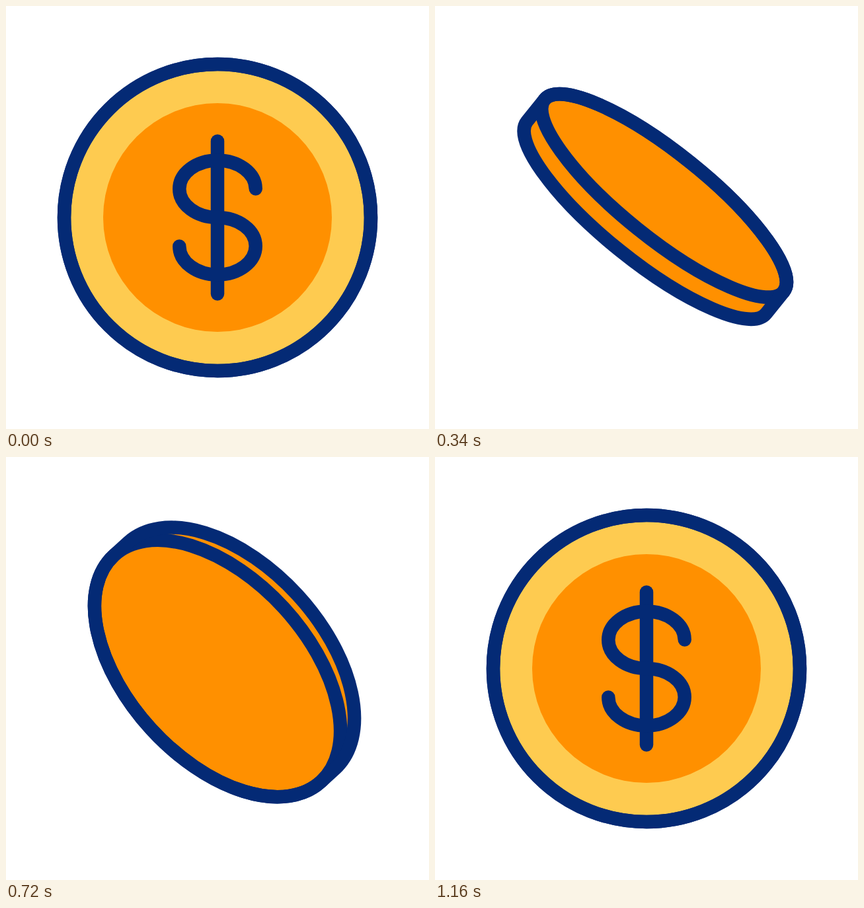
An HTML page that plays this animation: 640 px wide and 640 px high, repeating every 1400 ms.

```html
<!DOCTYPE html>
<html lang="en">
<head>
<meta charset="utf-8">
<title>Coin flip</title>
<style>
  html, body { margin: 0; width: 100%; height: 100%; overflow: hidden; background: #fff; }
  svg { display: block; width: 640px; height: 640px; }
  .line { fill: none; stroke: #042a75; stroke-width: 20.5; stroke-linecap: round; stroke-linejoin: round; }
  .line path { vector-effect: non-scaling-stroke; }
  .gold { fill: #ff9000; }
  .pale { fill: #fecb50; }
</style>
</head>
<body>
<svg viewBox="0 0 640 640">
  <g id="coin">
    <path id="body" class="gold"/>
    <g id="face">
      <circle class="pale" r="232"/>
      <circle class="gold" r="173"/>
      <g class="line">
        <path d="M0-115.5V115.5"/>
        <path d="M57.7-43.5A57.7 43.3 0 1 0 0 0A57.7 43.3 0 1 1-57.7 43.5"/>
      </g>
    </g>
    <path id="rim" class="line"/>
    <path id="side" class="gold" fill-rule="evenodd"/>
    <path id="outline" class="line"/>
  </g>
</svg>
<script>
const LOOP = 1400, STEP = 20, HALF = 560;
const R = 232, DEPTH = 47, TILT = 60;
const el = id => document.getElementById(id);
const coin = el('coin'), body = el('body'), face = el('face');
const rim = el('rim'), side = el('side'), outline = el('outline');

const span = (t, from, length) => Math.min(1, Math.max(0, (t - from) / length));
const smooth = u => u * u * (3 - 2 * u);
const ease = u => 0.9 * smooth(u) + 0.1 * u;

// Outline around two equal ellipses centred at x = a and x = b
const hull = (rx, a, b) =>
  `M${a} ${-R}L${b} ${-R}A${rx} ${R} 0 0 1 ${b} ${R}L${a} ${R}A${rx} ${R} 0 0 1 ${a} ${-R}Z`;

function pose(t) {
  const back = t >= HALF;                  // returning to the front side
  const u = back ? span(t, HALF, 560) : span(t, 0, 570);
  const turn = 1 - 2 * ease(u);
  const scale = back ? -turn : turn;
  const angle = -TILT * smooth(span(t, 0, 448)) * (1 - smooth(span(t, 520, 560)));
  const swell = smooth(1 - Math.abs(1 - 2 * u));
  const depth = DEPTH * (scale > 0 ? swell ** 1.7 : swell);
  return { scale, angle, depth, near: turn > 0 ? 0 : depth };
}

function draw(t) {
  const { scale, angle, depth, near } = pose(t);
  const front = scale > 0;
  const rx = Math.max(0.01, R * Math.abs(scale));
  const shell = hull(rx, 0, depth), disc = hull(rx, near, near);

  coin.setAttribute('transform', `translate(320 320) rotate(${angle})`);
  body.setAttribute('d', shell);
  outline.setAttribute('d', shell);
  rim.setAttribute('d', disc);
  face.style.display = front ? '' : 'none';
  side.style.display = front && depth > 0.1 ? '' : 'none';
  if (front) {
    face.setAttribute('transform', `translate(${near} 0) scale(${Math.max(scale, 0.001)} 1)`);
    side.setAttribute('d', shell + disc);
  }
}

const start = performance.now();
function tick() {
  const t = (performance.now() - start) % LOOP;
  draw(Math.floor(t / STEP) * STEP);
  requestAnimationFrame(tick);
}
draw(0);
requestAnimationFrame(tick);
</script>
</body>
</html>
```
